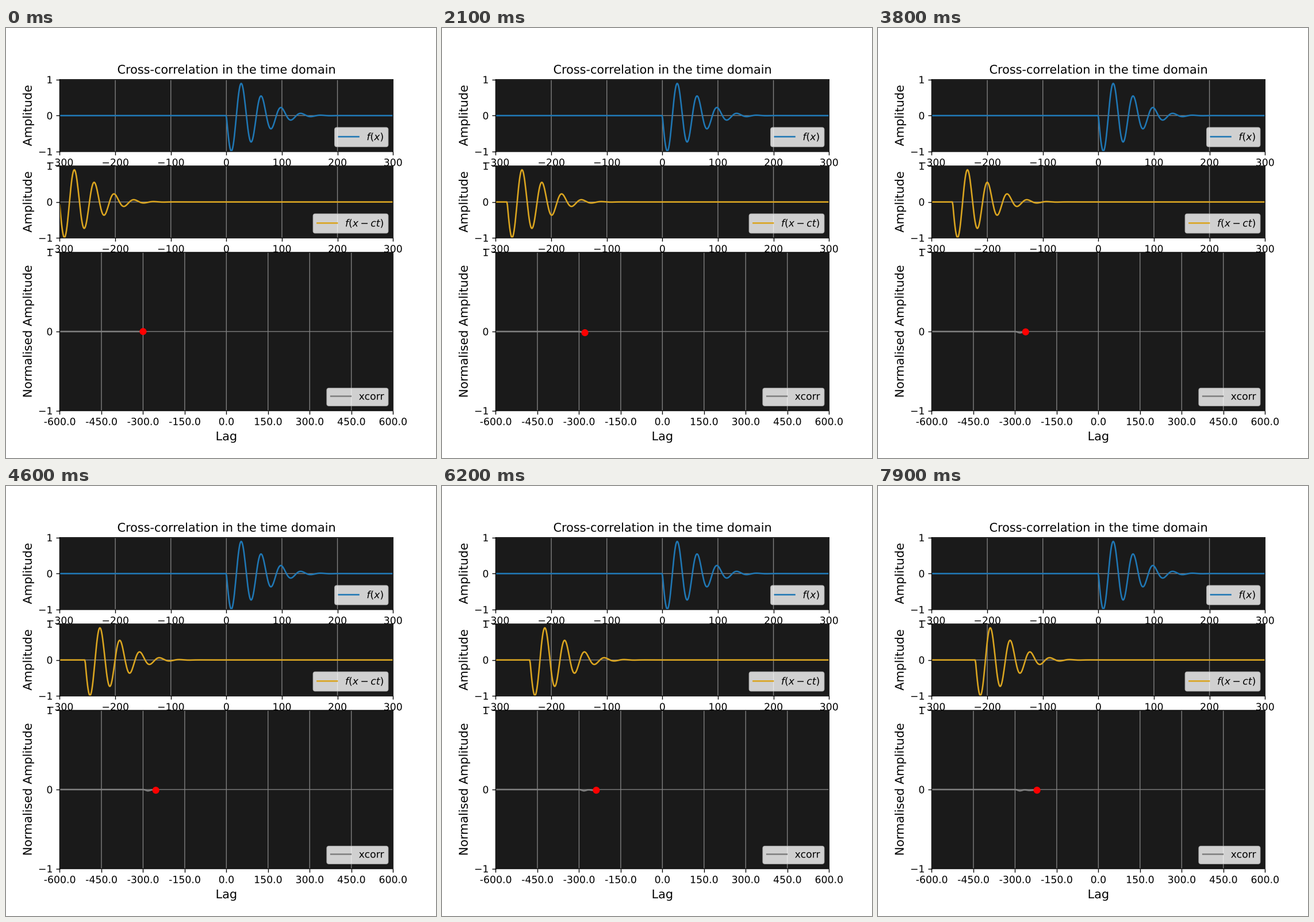
A matplotlib script that plays this animation: 748 by 748 pixels, repeating every 8 s.

```python
import numpy as np
import matplotlib.pyplot as plt
from matplotlib.animation import FuncAnimation
from matplotlib.gridspec import GridSpec
from matplotlib.patheffects import Normal

SIZE = 748
DPI = SIZE / 6
FRAMES = 80
HALF = 300
PERIOD = 36
SIGMA = 57

# Unsnapped lines and outline text keep every edge at its sub-pixel place.
plt.rcParams.update({
    "font.family": "DejaVu Sans",
    "font.size": 10,
    "text.hinting": "none",
    "path.snap": False,
    "path.effects": [Normal()],
})

x = np.linspace(-HALF, HALF, 2 * HALF)
envelope = np.exp(-x ** 2 / (2 * SIGMA ** 2))
pulse = np.where(x > 0, -envelope * np.sin(2 * np.pi * x / PERIOD), 0)


def xcorr(lag):
    """Faint ripple that sets in once the two signals start to overlap."""
    n = np.maximum(lag + HALF, 0)
    return -0.0087 * (1 - np.exp(-(n / 45) ** 2) * np.cos(2 * np.pi * n / PERIOD))


def style(ax, xticks, ylabel):
    ax.set_facecolor("#1a1a1a")
    ax.grid(color="gray")
    ax.set_xlim(xticks[0], xticks[-1])
    ax.set_ylim(-1, 1)
    ax.set_xticks(xticks)
    ax.set_yticks([-1, 0, 1])
    ax.set_ylabel(ylabel, fontsize=12)


fig = plt.figure(figsize=(SIZE / DPI, SIZE / DPI), dpi=DPI)
grid = GridSpec(4, 1, figure=fig)
ax_fixed = fig.add_subplot(grid[0])
ax_moving = fig.add_subplot(grid[1])
ax_corr = fig.add_subplot(grid[2:])

signal_ticks = np.arange(-HALF, HALF + 1, 100)
lag_ticks = np.linspace(-600, 600, 9)
style(ax_fixed, signal_ticks, "Amplitude")
style(ax_moving, signal_ticks, "Amplitude")
style(ax_corr, lag_ticks, "Normalised Amplitude")
ax_corr.set_xticks(lag_ticks, [str(float(t)) for t in lag_ticks])
ax_corr.set_xlabel("Lag", fontsize=12)
ax_fixed.set_title("Cross-correlation in the time domain", fontsize=12)

ax_fixed.plot(x, pulse, color="tab:blue", label="$f(x)$")
moving, = ax_moving.plot(x, pulse, color="goldenrod", label="$f(x-ct)$")
trace, = ax_corr.plot([], [], color="gray", label="xcorr")
dot, = ax_corr.plot([], [], "ro")

for ax in (ax_fixed, ax_moving, ax_corr):
    ax.legend(loc="lower right")


def update(i):
    lag = i - HALF
    lags = np.arange(-600, lag + 1)
    moving.set_ydata(np.roll(pulse, lag))
    trace.set_data(lags, xcorr(lags))
    dot.set_data([lag], [xcorr(lag)])
    return moving, trace, dot


anim = FuncAnimation(fig, update, frames=FRAMES, init_func=lambda: update(0),
                     interval=100, repeat=True, repeat_delay=0)
plt.show()
```
